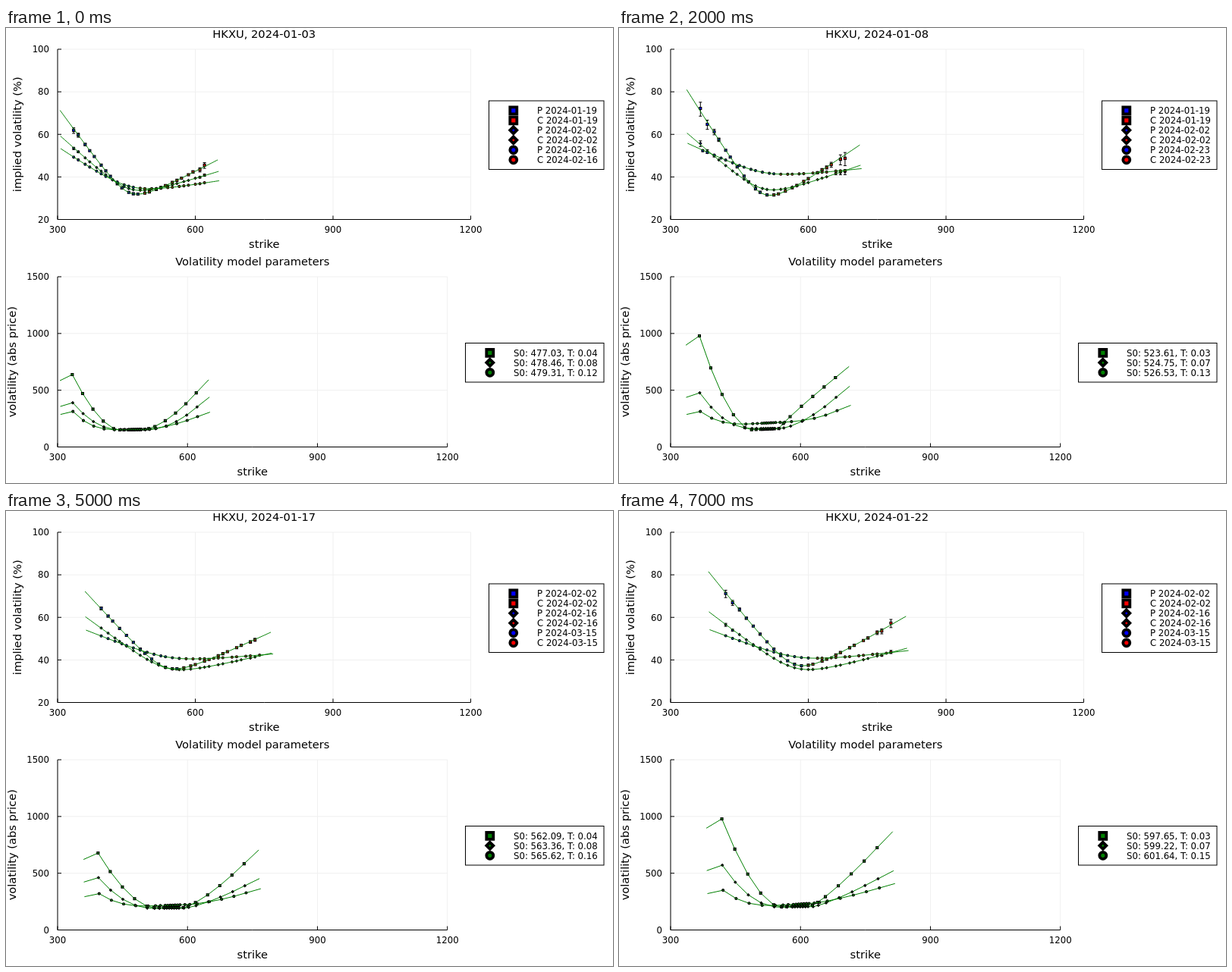
An HTML page with a canvas for the animation above (8 s loop, 800 by 600 pixels).

```html
<!DOCTYPE html>
<html lang="en">
<head>
<meta charset="utf-8">
<title>Implied volatility</title>
<style>
html, body { margin: 0; width: 100%; height: 100%; overflow: hidden; background: #fff; }
canvas { display: block; }
</style>
</head>
<body>
<canvas id="stage" width="800" height="600"></canvas>
<script>
const ctx = document.getElementById('stage').getContext('2d');
const GREEN = '#008000';
const SHAPES = ['square', 'diamond', 'circle'];

// Shape constants for the short, middle and long expiry
const ROUNDING = [1.5, 1.8, 2.4];
const LEFT_BEND = [1.65, 2.05, 2.7];
const NOISE = [1, 0.4, 0.15];

// Distances k from the spot are counted in steps of 5 % of its price
const EDGE = 7.2;
const VERTEX = -0.9;
const HALF_MARKS = [0.2, 0.4, 0.6, 1, 1.4, 2, 3, 4, 5, 6];
const MARKS = [...HALF_MARKS.map(k => -k).reverse(), 0, ...HALF_MARKS];

const upper = {
  x0: 68, x1: 612.5, y0: 252.5, y1: 28, min: 20, max: 100, yStep: 20,
  yLabel: 'implied volatility (%)', yLabelX: 15
};
const lower = {
  x0: 68, x1: 581.7, y0: 552.5, y1: 328, min: 0, max: 1500, yStep: 500,
  yLabel: 'volatility (abs price)', yLabelX: 8
};

const px = (p, strike) => p.x0 + (strike - 300) / 900 * (p.x1 - p.x0);
const py = (p, v) => p.y0 + (v - p.min) / (p.max - p.min) * (p.y1 - p.y0);
const strikeAt = (spot, k) => spot * (1 + 0.05 * k);
const random = seed => Math.abs(Math.sin(seed * 12.9898) * 43758.5453) % 1;

// fit: left end, vertex, right end; model: left knot, middle, tilt, right knot, right bend
const smile = (expiry, spot, term, fit, model) => ({ expiry, spot, term, fit, model });
const day = (date, spread, ...smiles) => ({ date, spread, smiles });

// A day halfway between two others; each row is [expiry, spot, term]
function between(a, b, date, ...rows) {
  const mid = (u, v) => u.map((n, i) => (n + v[i]) / 2);
  return day(date, 0.8, ...rows.map((row, i) => {
    const s = a.smiles[i], t = b.smiles[i];
    return smile(...row, mid(s.fit, t.fit), mid(s.model, t.model));
  }));
}

const jan03 = day('01-03', 1.5,
  smile('01-19', 477.03, 0.04, [71.3, 32.7, 48], [638, 153, 2, 477, 1.6]),
  smile('02-02', 478.46, 0.08, [59.2, 34.4, 42.6], [390, 152, 0, 353, 2]),
  smile('02-16', 479.31, 0.12, [53.3, 35.5, 38.2], [313, 154, 1, 267, 1.6]));
const jan05 = day('01-05', 17,
  smile('01-19', 491.93, 0.04, [92.7, 28.4, 53.3], [2400, 140, 0, 781, 1.9]),
  smile('02-02', 493.06, 0.08, [58.3, 32.7, 46.2], [424, 158, 0, 461, 2.3]),
  smile('02-23', 494.80, 0.13, [54.7, 40.9, 41], [283, 190, 3, 307, 3]));
const jan08 = day('01-08', 3.5,
  smile('01-19', 523.61, 0.03, [81, 32.2, 55], [979, 158, 4, 611, 0.9]),
  smile('02-02', 524.75, 0.07, [60.6, 34.5, 45.5], [477, 163, 0, 437, 1.6]),
  smile('02-23', 526.53, 0.13, [55.8, 42.1, 43.9], [313, 212, 5, 320, 2.6]));
const jan10 = day('01-10', 0.8,
  smile('01-26', 544.71, 0.04, [72.2, 33.8, 52], [811, 174, 1, 581, 1.25]),
  smile('02-09', 546.04, 0.08, [58.5, 34.9, 43.5], [451, 174, 1, 397, 1.6]),
  smile('03-15', 549.04, 0.18, [51.9, 41.2, 42.1], [283, 211, 3, 310, 1.4]));
const jan17 = day('01-17', 0.8,
  smile('02-02', 562.09, 0.04, [72.2, 36.4, 53], [678, 197, 0, 584, 1.35]),
  smile('02-16', 563.36, 0.08, [60.3, 36.2, 43.2], [461, 192, 1, 390, 1.4]),
  smile('03-15', 565.62, 0.16, [54, 41.3, 42.8], [320, 219, 4, 327, 1.7]));
const jan22 = day('01-22', 2,
  smile('02-02', 597.65, 0.03, [81.5, 37.9, 60.5], [979, 212, 6, 725, 1.2]),
  smile('02-16', 599.22, 0.07, [62.6, 36.2, 45.5], [571, 204, 2, 451, 1.25]),
  smile('03-15', 601.64, 0.15, [54.2, 41.4, 44.4], [350, 230, 7, 370, 1.35]));
const jan12 = between(jan10, jan17, '01-12',
  ['01-26', 547.92, 0.04], ['02-09', 549.24, 0.08], ['03-15', 552.03, 0.17]);
const jan19 = between(jan17, jan22, '01-19',
  ['02-02', 595.61, 0.04], ['02-16', 597.12, 0.08], ['03-15', 599.48, 0.15]);
const days = [jan03, jan05, jan08, jan10, jan12, jan17, jan19, jan22];

// Tilted hyperbola through both ends and the vertex
function impliedCurve([left, low, right], rounding) {
  const rise = x => Math.hypot(x, rounding) - rounding;
  const a = -EDGE - VERTEX, b = EDGE - VERTEX;
  const bend = ((left - low) * b - (right - low) * a) / (rise(a) * b - rise(b) * a);
  const tilt = (left - low - bend * rise(a)) / a;
  return k => low + bend * rise(k - VERTEX) + tilt * (k - VERTEX);
}

// Nearly flat middle with a power-law wing on each side
function modelCurve([left, middle, tilt, right, rightBend], leftBend) {
  const wing = (k, start, power) => (Math.max(0, k - start) / (6 - start)) ** power;
  return k => middle + tilt * k
    + (left - middle + 6 * tilt) * wing(-k, 1.5, leftBend)
    + (right - middle - 6 * tilt) * wing(k, 1, rightBend);
}

function text(str, x, y, size, align = 'center') {
  ctx.font = `${size}px "DejaVu Sans", sans-serif`;
  ctx.textAlign = align;
  ctx.textBaseline = 'alphabetic';
  ctx.fillStyle = '#000';
  ctx.fillText(str, x, y + size * 0.365);
}

function path(points, color) {
  ctx.beginPath();
  points.forEach(([x, y]) => ctx.lineTo(x, y));
  ctx.strokeStyle = color;
  ctx.lineWidth = 1;
  ctx.stroke();
}

function marker(shape, x, y, r, fill, width) {
  ctx.beginPath();
  if (shape === 'square') ctx.rect(x - r, y - r, 2 * r, 2 * r);
  else if (shape === 'circle') ctx.arc(x, y, r, 0, 7);
  else {
    [[0, -r], [r, 0], [0, r], [-r, 0]].forEach(([a, b]) => ctx.lineTo(x + a, y + b));
    ctx.closePath();
  }
  ctx.fillStyle = fill;
  ctx.fill();
  ctx.strokeStyle = '#000';
  ctx.lineWidth = width;
  ctx.stroke();
}
const dot = (i, x, y, fill) => marker(SHAPES[i], x, y, 1.5, fill, 1.1);

function axes(p, title) {
  const { x0, x1, y0, y1 } = p, midX = (x0 + x1) / 2;
  for (let s = 300; s <= 1200; s += 300) {
    const x = px(p, s);
    path([[x, y0], [x, y1]], '#f0f0f0');
    path([[x, y0], [x, y0 - 5]], '#000');
    text(s, x, y0 + 13.5, 11.73);
  }
  for (let v = p.min; v <= p.max; v += p.yStep) {
    const y = py(p, v);
    path([[x0, y], [x1, y]], '#f0f0f0');
    path([[x0, y], [x0 + 5, y]], '#000');
    text(v, x0 - 11, y, 11.73, 'right');
  }
  path([[x0, y1], [x0, y0], [x1, y0]], '#000');
  text(title, midX, y1 - 20, 14.67);
  text('strike', midX, y0 + 32.5, 14.67);
  ctx.save();
  ctx.translate(p.yLabelX, (y0 + y1) / 2);
  ctx.rotate(-Math.PI / 2);
  text(p.yLabel, 0, 0, 14.67);
  ctx.restore();
}

function legend(x, y, rows) {
  ctx.strokeStyle = '#000';
  ctx.lineWidth = 1;
  ctx.strokeRect(x, y, 788 - x, 13 * rows.length + 12.5);
  rows.forEach(([shape, fill, label], i) => {
    const rowY = y + 12.8 + 13 * i;
    marker(shape, x + 32.3, rowY, 4.5, fill, 3.8);
    text(label, x + 63.5, rowY, 11.73, 'left');
  });
}

function clipped(p, draw) {
  ctx.save();
  ctx.beginPath();
  ctx.rect(p.x0, p.y1, p.x1 - p.x0, p.y0 - p.y1);
  ctx.clip();
  draw();
  ctx.restore();
}

// Market quotes scatter around the curve, more so in the wings
function drawQuotes({ spot, fit }, i, spread) {
  const curve = impliedCurve(fit, ROUNDING[i]);
  for (let n = 0; n <= 24; n++) {
    const raw = spot * (0.7 + 0.025 * n), step = raw > 600 ? 10 : 5;
    const strike = Math.round(raw / step) * step, k = (strike / spot - 1) * 20;
    const noise = spread * NOISE[i] * Math.max(0, (Math.abs(k) - 3) / 3) ** 2;
    const x = px(upper, strike);
    const v = curve(k) + noise * (random(strike) - 0.5);
    const top = py(upper, v + noise * 0.8), bottom = py(upper, v - noise);
    if (bottom - top > 2) {
      path([[x, top], [x, bottom]], '#000');
      for (const y of [top, bottom]) path([[x - 2, y], [x + 2, y]], '#000');
    }
    dot(i, x, py(upper, v), strike < spot ? '#00f' : '#f00');
  }
}

function drawFit({ spot, fit }, i) {
  const curve = impliedCurve(fit, ROUNDING[i]), points = [];
  for (let n = -72; n <= 72; n++) {
    points.push([px(upper, strikeAt(spot, n / 10)), py(upper, curve(n / 10))]);
  }
  path(points, GREEN);
}

function drawModel({ spot, model }, i) {
  const curve = modelCurve(model, LEFT_BEND[i]);
  const at = (k, v) => [px(lower, strikeAt(spot, k)), py(lower, v)];
  const marks = MARKS.map(k => at(k, curve(k)));
  const rightTail = curve(6) + (EDGE - 6) * (curve(6) - curve(5));
  path([at(-EDGE, 0.916 * curve(-6)), ...marks, at(EDGE, rightTail)], GREEN);
  marks.forEach(([x, y]) => dot(i, x, y, GREEN));
}

function draw({ date, spread, smiles }) {
  ctx.fillStyle = '#fff';
  ctx.fillRect(0, 0, 800, 600);
  axes(upper, `HKXU, 2024-${date}`);
  axes(lower, 'Volatility model parameters');
  clipped(upper, () => {
    smiles.forEach((s, i) => drawQuotes(s, i, spread));
    smiles.forEach(drawFit);
  });
  clipped(lower, () => smiles.forEach(drawModel));
  legend(636.5, 96, smiles.flatMap(({ expiry }, i) => [
    [SHAPES[i], '#00f', `P 2024-${expiry}`], [SHAPES[i], '#f00', `C 2024-${expiry}`]
  ]));
  legend(605.5, 415.5, smiles.map(({ spot, term }, i) =>
    [SHAPES[i], GREEN, `S0: ${spot.toFixed(2)}, T: ${term.toFixed(2)}`]));
}

function tick() {
  draw(days[Math.floor(performance.now() / 1000) % days.length]);
  requestAnimationFrame(tick);
}
tick();
</script>
</body>
</html>
```
